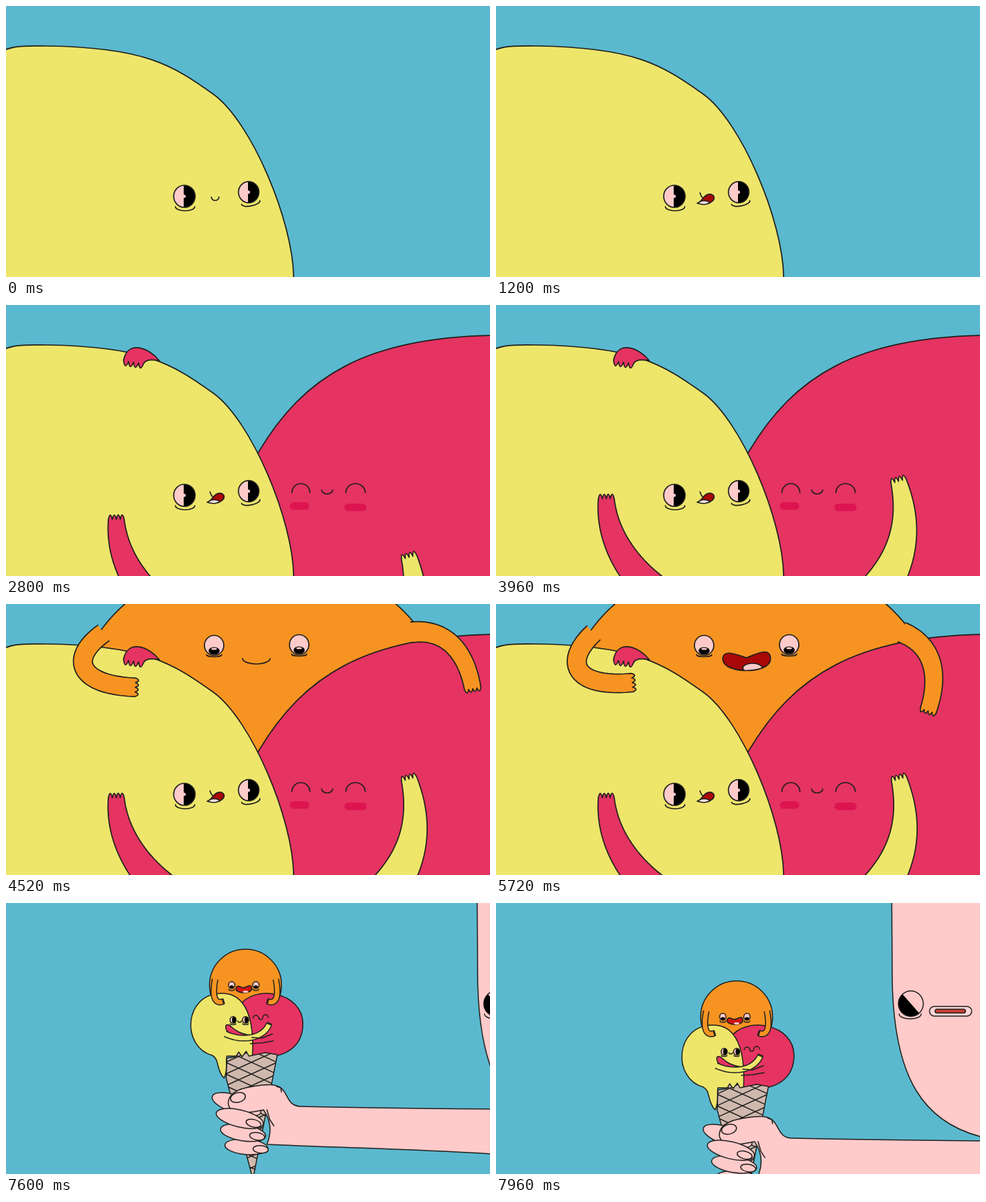
An HTML page with a canvas for the animation above (8 s loop, 700 by 393 pixels).

```html
<!DOCTYPE html>
<html lang="en">
<head>
<meta charset="utf-8">
<title>Scoops</title>
<style>
html, body { margin: 0; width: 100%; height: 100%; overflow: hidden; background: #5ab9cf; }
canvas { display: block; width: 700px; height: 393px; }
</style>
</head>
<body>
<canvas id="c" width="700" height="393"></canvas>
<script>
const g = document.getElementById('c').getContext('2d');
const SKY = '#5ab9cf', YEL = '#eee66b', RED = '#e53362', ORA = '#f79421', SKIN = '#ffcaca',
  CONE = '#cfb8ad', INK = '#20201e', CHEEK = '#dc1550', MOUTH = '#a90808';
const LOOP = 8000, CUT = 7280, TAU = 2 * Math.PI;

// ---------- timing ----------
const clamp = v => Math.max(0, Math.min(1, v));
const mix = (a, b, k) => a.map((v, i) => v + (b[i] - v) * k);
// Progress 0..1 over n drawings, a new one every 80 ms.
const step = (t, start, n) => clamp((Math.floor((t - start) / 80) + 1) / n);
// Eyelid: half shut, then shut.
function blink(t, start) {
  const d = t - start;
  return d < 0 || d >= 200 ? 0 : d < 80 ? 0.5 : 1;
}

// ---------- drawing ----------
function at(x, y, fn, turn = 0) {
  g.save();
  g.translate(x, y);
  g.rotate(turn);
  fn();
  g.restore();
}
function inside(fn) { g.save(); g.clip(); fn(); g.restore(); }
function paint(fill) { g.fillStyle = fill; g.fill(); g.stroke(); }

// Start point followed by cubic segments, then straight corners.
function curve(p, ...corners) {
  g.beginPath();
  g.moveTo(p[0], p[1]);
  for (let i = 2; i < p.length; i += 6) g.bezierCurveTo(...p.slice(i, i + 6));
  for (const c of corners) g.lineTo(...c);
}
function shape(fill, p, ...corners) {
  curve(p, ...corners);
  g.closePath();
  paint(fill);
}
function ring(x, y, rx, ry, turn = 0) {
  g.beginPath();
  g.ellipse(x, y, rx, ry, turn, 0, TAU);
}
function oval(fill, x, y, rx, ry, turn) { ring(x, y, rx, ry, turn); paint(fill); }
function dot(fill, x, y, rx, ry) { ring(x, y, rx, ry); g.fillStyle = fill; g.fill(); }
function pill(fill, x, y, w, h) {
  g.beginPath();
  g.roundRect(x, y, w, h, h / 2);
  g.fillStyle = fill;
  g.fill();
}
function line(...p) {
  g.beginPath();
  for (let i = 0; i < p.length; i += 2) g.lineTo(p[i], p[i + 1]);
  g.stroke();
}
// Half an ellipse: a cup, or an arch when ry is negative.
function cup(x, y, rx, ry, turn = 0) {
  const from = ry > 0 ? 0 : Math.PI;
  g.beginPath();
  g.ellipse(x, y, rx, Math.abs(ry), turn, from, from + Math.PI);
  g.stroke();
}

// Row of finger tips from a to b, added to the current path.
function fingers(ax, ay, bx, by, depth, n = 4) {
  const dx = (bx - ax) / n, dy = (by - ay) / n, len = Math.hypot(dx, dy);
  for (let i = 0; i < n; i++) {
    g.quadraticCurveTo(ax + dx * (i + 0.5) - dy / len * depth, ay + dy * (i + 0.5) + dx / len * depth,
      ax + dx * (i + 1), ay + dy * (i + 1));
  }
}
// Arm along a cubic centre line, open at the root, tapering from w0 to w1.
function arm(fill, [x0, y0, x1, y1, x2, y2, x3, y3], w0, w1, depth = 13, taper = 1) {
  const N = 24, a = [], b = [];
  for (let i = 0; i <= N; i++) {
    const u = i / N, v = 1 - u;
    const along = (p, q, r, s) => v * v * v * p + 3 * v * v * u * q + 3 * v * u * u * r + u * u * u * s;
    const slope = (p, q, r, s) => v * v * (q - p) + 2 * v * u * (r - q) + u * u * (s - r);
    const x = along(x0, x1, x2, x3), y = along(y0, y1, y2, y3);
    const dx = slope(x0, x1, x2, x3), dy = slope(y0, y1, y2, y3);
    const w = (w0 + (w1 - w0) * u ** taper) / 2 / Math.hypot(dx, dy);
    a.push([x - dy * w, y + dx * w]);
    b.unshift([x + dy * w, y - dx * w]);
  }
  g.beginPath();
  for (const p of a) g.lineTo(...p);
  fingers(...a[N], ...b[0], depth);
  for (const p of b) g.lineTo(...p);
  paint(fill);
}

// ---------- faces ----------
function eye(x, y, r, lid, skin, pupil) {
  if (lid === 1) return cup(x, y + 2, r, r * 0.5);
  dot(SKIN, x, y, r, r + 0.5);
  inside(() => {
    pupil();
    if (lid) {
      g.fillStyle = skin;
      g.fillRect(x - r, y - r - 1, 2 * r, r + 1);
      line(x - r, y, x + r, y);
    }
  });
  ring(x, y, r, r + 0.5);
  g.stroke();
}
// Eye looking sideways: one half is black.
function sideEye(x, y, r, dir, lid, skin) {
  eye(x, y, r, lid, skin, () => {
    g.fillStyle = '#000';
    g.fillRect(dir > 0 ? x - 1 : x + 1 - 2 * r, y - 2 * r, 2 * r, 4 * r);
    dot(SKIN, x - dir, y, 3, 2.5);
  });
}
function downEye(x, y, lid) {
  eye(x, y, 14, lid, ORA, () => {
    dot('#000', x, y + 8, 8, 5.5);
    dot(SKIN, x, y + 5, 4, 1.6);
  });
  cup(x, y + 13.5, 11, 3);
}

function yellowFace(t) {
  const lid = blink(t, 440);
  sideEye(258, 276, 15.5, 1, lid, YEL);
  sideEye(351, 270, 14.8, 1, lid, YEL);
  cup(259, 291, 14, 6);
  cup(354, 285, 13.5, 5, -0.2);
  const talk = step(t, 1040, 3);
  if (!talk) return cup(302.5, 277, 5.5, 5);
  at(291, 285, () => {
    g.scale(0.6 + 0.4 * talk, talk);
    const lips = [0, 1, 8, -1, 9, -13, 20, -12, 32, -8, 18, 8, 0, 1];
    curve(lips);
    g.fillStyle = MOUTH;
    g.fill();
    inside(() => oval('#ffe3e3', 10, 2, 9, 4.5));
    curve(lips);
    g.stroke();
    line(4, -14, 6, -9, 9, -6);
  });
}

function redFace(x, y, t) {
  at(x, y, () => {
    pill(CHEEK, -54, 20, 28, 11);
    pill(CHEEK, 25, 22, 32, 11);
    if (t >= 2320) {
      cup(-38, 6, 13, -13);
      cup(41, 6, 14, -13);
    } else {
      const lid = blink(t, 2240);
      sideEye(-37, 0, 16.5, -1, lid, RED);
      sideEye(42, 1, 16.5, -1, lid, RED);
    }
    cup(0, 2, 8, 6);
  });
}

function orangeFace(t) {
  const lid = blink(t, 5520), open = step(t, 5000, 3);
  downEye(301, 60, lid);
  downEye(424, 59, lid);
  if (!open) return cup(362, 79, 20, 8);
  const drop = 20 * Math.abs(Math.sin(step(t, 6120, 7) * TAU));
  at(362, 80, () => {
    const low = 22 * open + drop * 4 / 3, top = -16 * open;
    const lips = [-34, 0, -34, top, -12, -6 * open, 0, -2, 12, -6 * open, 35, top * 1.25, 35, 0,
      35, low, -34, low, -34, 0];
    curve(lips);
    g.fillStyle = MOUTH;
    g.fill();
    inside(() => oval(SKIN, 9, 13 * open + drop, 14, 7));
    curve(lips);
    g.stroke();
  });
}

// ---------- close-up ----------
const YELLOW = [-20, 72, 10, 56, 20, 58, 60, 58, 200, 60, 240, 85, 300, 128, 355, 168, 415, 312, 416, 393];
const RED_IN = [447, 393, 447, 330, 462, 260, 488, 218, 525, 128, 600, 66, 720, 50];
const RED_ON = [315, 393, 318, 330, 340, 255, 366, 212, 430, 105, 520, 44, 720, 44];
const PAT_HIGH = [530, 440, 590, 380, 602, 320, 583, 254];
const PAT_LOW = [545, 440, 580, 385, 584, 330, 569, 290];

// Entry spends five drawings sliding in and two leaning over.
const leanAt = t => clamp(step(t, 1400, 7) * 3.5 - 2.5);

function redBack(t) {
  const lean = leanAt(t), away = 1 - clamp((step(t, 1400, 7) * 7 - 1) / 4);
  const up = 14 * Math.sin(Math.PI * lean);
  at(215 * away ** 1.3, -up, () => {
    const p = mix(RED_IN, RED_ON, lean);
    shape(RED, p, [1000, 44], [1000, 500], [p[0], 500]);
    if (lean < 1) {
      at(-120 * lean, 40 * lean, () => arm(RED, [485, 238, 440, 216, 370, 172, 303, 123], 39, 13, 9, 3));
    }
    redFace(552 - 87.5 * lean, 266 + up / 2, t);
  });
}

function redHug(t) {
  const lean = leanAt(t), rise = step(t, 2640, 4);
  if (lean) {
    at(90 * (1 - lean), 30 * (1 - lean), () => {
      curve([222, 81, 206, 61, 176, 51, 170, 80]);
      fingers(170, 81, 199, 85, 14);
      g.quadraticCurveTo(203, 77, 222, 81);
      paint(RED);
    });
  }
  if (rise) at(0, 120 * (1 - rise), () => arm(RED, [250, 432, 185, 385, 160, 330, 159.5, 281], 52, 23));
}

function yellowHug(t) {
  const rise = step(t, 2800, 5);
  if (!rise) return;
  const pat = Math.sin(step(t, 3640, 7) * TAU * 0.75 + 0) ** 2 * (t < 4120);
  at(0, 140 * (1 - rise), () => arm(YEL, mix(PAT_HIGH, PAT_LOW, pat), 62, 23));
}

function orangeBack(t) {
  const fall = step(t, 4040, 6);
  if (!fall) return;
  at(0, -390 * (1 - fall) ** 1.5, () => {
    oval(ORA, 368, 150, 268, 220);
    orangeFace(t);
  });
}

function orangeArms(t) {
  const settle = step(t, 4520, 3), swing = 1 - settle;
  if (!settle) return;
  at(141, 42, () => arm(ORA, [0, 0, -46, 43, -26, 80, 56, 72], 28, 27, 9), 0.2 * swing);
  at(587, 41, () => arm(ORA, [0, 0, 47, 19, 55, 64, 38, 114], 30, 24, 9), -0.75 * swing);
}

function closeUp(t) {
  g.lineWidth = 1.7;
  orangeBack(t);
  if (t >= 1400) redBack(t);
  shape(YEL, YELLOW, [416, 500], [-20, 500]);
  yellowFace(t);
  redHug(t);
  yellowHug(t);
  orangeArms(t);
}

// ---------- wide view ----------
function scoops() {
  oval(ORA, 345, 82, 52, 52);
  for (const x of [325, 360]) {
    oval(SKIN, x, 82, 4.6, 5);
    dot('#000', x, 84.5, 3, 2);
    cup(x, 88, 4, 2);
  }
  shape('#d01515', [331, 87, 333, 80, 339, 86, 342, 86, 346, 85, 354, 79, 354, 87, 354, 95, 331, 95, 331, 87]);
  dot(SKIN, 345, 91.5, 4, 1.6);

  shape(RED, [336, 112, 358, 80, 428, 92, 428, 138, 428, 170, 405, 190, 355, 187], [335, 187]);
  shape(YEL, [355, 185, 358, 130, 345, 94, 311, 94, 255, 94, 252, 172, 297, 184,
    308, 190, 302, 205, 314, 217, 320, 205, 316, 195, 318, 185]);
  for (const x of [327, 345]) {
    oval(SKIN, x, 132.5, 4.4, 4.8);
    dot('#000', x + 1.5, 132.5, 3, 4.6);
    cup(x, 138, 4, 1.5);
  }
  cup(336.5, 134, 2.5, 2);
  cup(360, 130, 4, -4);
  cup(374, 129, 4, -4);
  cup(367, 130, 2.5, 2);

  shape(RED, [317, 140, 324, 136, 325, 152, 354, 155, 335, 160, 312, 152, 317, 140]);
  arm(YEL, [316, 153, 340, 164, 370, 160, 379, 139], 8, 8, 4);
  line(354, 158, 368, 159, 384, 153);
  line(352, 167, 368, 166, 385, 163);
  for (const side of [-1, 1]) {
    at(345, 0, () => {
      g.scale(side, 1);
      arm(ORA, [44, 74, 48, 95, 46, 110, 33, 106], 8, 8, 4);
    });
  }
}

function cone() {
  const edge = () => curve([318, 188], [331, 186], [335, 179], [340, 186], [346, 178], [350, 185],
    [374, 180], [391, 183], [357, 357], [354, 357], [317, 217], [318, 188]);
  edge();
  g.fillStyle = CONE;
  g.fill();
  inside(() => {
    for (let y = 158; y < 370; y += 17) {
      line(312, y, 395, y + 38);
      line(312, y + 38, 395, y);
    }
  });
  edge();
  g.stroke();
}

function finger(i) {
  at(332 + 4.7 * i, 255 + 20.5 * i, () => {
    oval(SKIN, 0, 0, 37 - 2 * i, 13 - 0.6 * i);
    if (i) oval(SKIN, 21, 2, 11, 5.5);
  }, 0.32 - 0.08 * i);
}

function hand() {
  finger(0);
  // thumb, palm and forearm
  curve([720, 328, 600, 320, 480, 318, 376, 313, 382, 298, 383, 280, 371, 263, 350, 268, 322, 270, 320, 254,
    320, 236, 340, 230, 370, 227, 414, 221, 396, 257, 425, 258, 500, 260, 600, 261, 720, 262]);
  paint(SKIN);
  oval(SKIN, 334, 245, 11, 7, -0.25);
  for (const i of [3, 2, 1]) finger(i);
  line(376, 263, 380, 277, 386, 286);
  line(390, 229, 396, 231, 397, 237);
}

function giant(x) {
  at(x, 0, () => {
    shape(SKIN, [572, -60, 572, 0, 573, 60, 573, 100, 573, 250, 615, 325, 720, 343], [1000, 343], [1000, -60]);
    oval(SKIN, 600, 146, 18, 18.5);
    g.beginPath();
    g.arc(600, 146, 18, 0.85, 0.85 + Math.PI);
    g.fillStyle = '#000';
    g.fill();
    cup(599, 161, 16, 7);
    pill('#ffd6d6', 627, 150, 61, 14);
    g.stroke();
    pill('#c8402f', 635, 154, 44, 5.5);
    g.stroke();
  });
}

function wideView(s) {
  g.lineWidth = 1.5;
  at(s * 0.0044, s * (0.11 + s * 1.79e-5), () => {
    scoops();
    cone();
    hand();
  });
  giant((680 - s) * 0.303);
}

function draw(now) {
  const t = Math.floor(now % LOOP / 40) * 40;
  g.strokeStyle = INK;
  g.lineCap = g.lineJoin = 'round';
  g.fillStyle = SKY;
  g.fillRect(0, 0, 700, 393);
  if (t < CUT) closeUp(t);
  else wideView(t - CUT);
  requestAnimationFrame(draw);
}
requestAnimationFrame(draw);
</script>
</body>
</html>
```
